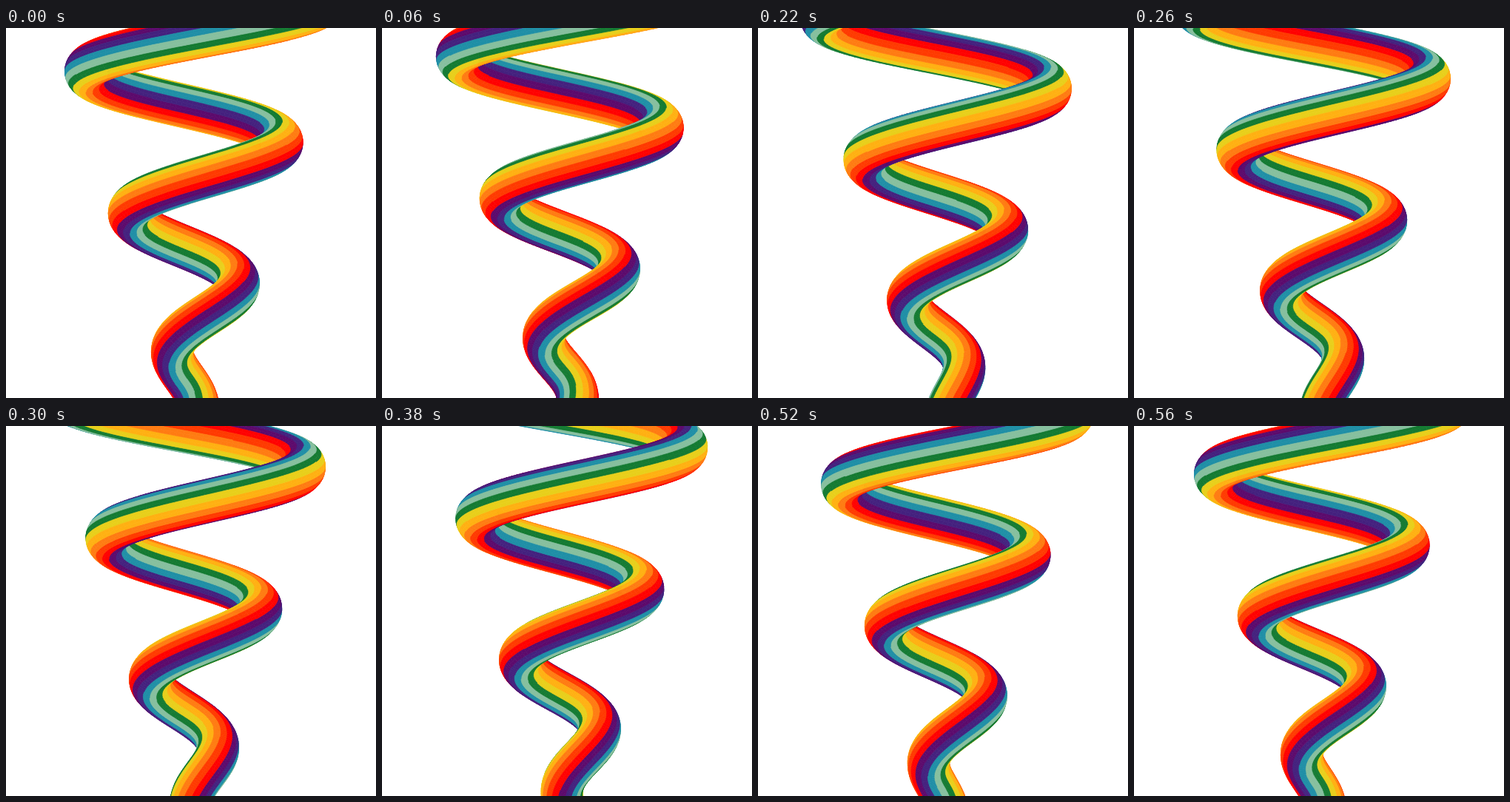
Animation of 500 by 500 pixels, one loop 580 ms. Source, as an HTML page with a canvas:

```html
<!DOCTYPE html>
<html lang="en">
<head>
<meta charset="utf-8">
<title>Rainbow helix</title>
<style>
  html, body { margin: 0; width: 100%; height: 100%; overflow: hidden; background: #fff; }
  canvas { display: block; width: 500px; height: 500px; }
</style>
</head>
<body>
<canvas id="stage" width="500" height="500"></canvas>
<script>
const SIZE = 500, STEP_MS = 20, STEPS = 29;
const COLORS = ['#1f8fa6', '#44217e', '#5c0a6c', '#ff0000', '#ff3a00',
                '#ff7b12', '#ffb012', '#e8cf1a', '#147a32', '#86bf9e'];
const FACETS = 40;            // two per stripe, the palette goes round twice
const CENTER = 255;
const PITCH = 193, OMEGA = 2 * Math.PI / PITCH, RISE = 1 / OMEGA;
const TAPER = 0.303;          // the helix widens towards the top
const TOP = -44, BOTTOM = 540, RING_GAP = 2;

// Angle, in stripes, by which a twist-free frame turns on the conical helix
function frameTurn(reach) {
  const lean = RISE * Math.hypot(1, TAPER);
  const speed = Math.hypot(reach, lean);
  return 10 / Math.PI / TAPER *
    (Math.asinh(reach / lean) - TAPER * Math.atan(TAPER * reach / speed));
}

// One cross-section of the tube at height y, as [x, y, z, normalZ] points.
function ring(y, turn) {
  const reach = 88.5 + TAPER * (250 - y);
  const tube = 28.8 + 0.003 * (250 - y);
  const u = OMEGA * (y - 253.5) + 2 * Math.PI * turn;
  const cos = Math.cos(u), sin = Math.sin(u);

  let tx = TAPER * cos + reach * OMEGA * sin;
  let ty = 1;
  let tz = TAPER * sin - reach * OMEGA * cos;
  const tl = Math.hypot(tx, ty, tz);
  tx /= tl; ty /= tl; tz /= tl;

  // Outward normal, made perpendicular to the tangent
  const dot = -cos * tx - sin * tz;
  let nx = -cos - dot * tx, ny = -dot * ty, nz = -sin - dot * tz;
  const nl = Math.hypot(nx, ny, nz);
  nx /= nl; ny /= nl; nz /= nl;

  const bx = ny * tz - nz * ty;
  const by = nz * tx - nx * tz;
  const bz = nx * ty - ny * tx;

  // The tube also spins half a turn per loop
  const shift = 23.3 - frameTurn(reach) + 10 * turn;
  const points = [];
  for (let j = 0; j <= FACETS; j++) {
    const a = (j / 2 - shift) * Math.PI / 10;
    const c = Math.cos(a), s = Math.sin(a);
    const face = c * nz + s * bz;
    points.push([
      CENTER - reach * cos + tube * (c * nx + s * bx),
      y + tube * (c * ny + s * by),
      -reach * sin + tube * face,
      face
    ]);
  }
  return points;
}

function render(turn) {
  const canvas = document.createElement('canvas');
  canvas.width = canvas.height = SIZE;
  const ctx = canvas.getContext('2d');
  ctx.fillStyle = '#fff';
  ctx.fillRect(0, 0, SIZE, SIZE);
  ctx.lineWidth = 0.7;
  ctx.lineJoin = 'round';

  const quads = [];
  let prev = ring(TOP, turn);
  for (let y = TOP + RING_GAP; y <= BOTTOM; y += RING_GAP) {
    const next = ring(y, turn);
    for (let j = 0; j < FACETS; j++) {
      const corners = [prev[j], prev[j + 1], next[j + 1], next[j]];
      if (corners.every(p => p[3] < 0)) continue;
      const depth = corners.reduce((sum, p) => sum + p[2], 0);
      quads.push({ corners, depth, color: COLORS[(j >> 1) % 10] });
    }
    prev = next;
  }

  quads.sort((a, b) => a.depth - b.depth);
  for (const { corners, color } of quads) {
    ctx.fillStyle = ctx.strokeStyle = color;
    ctx.beginPath();
    for (const [x, y] of corners) ctx.lineTo(x, y);
    ctx.closePath();
    ctx.fill();
    ctx.stroke();
  }
  return canvas;
}

const stage = document.getElementById('stage').getContext('2d');
const cache = [];
let start, shown = -1;

function draw(now) {
  if (start === undefined) start = now;
  const step = Math.floor(Math.max(0, now - start) / STEP_MS) % STEPS;
  if (step !== shown) {
    cache[step] = cache[step] || render(step / STEPS);
    stage.drawImage(cache[step], 0, 0);
    shown = step;
  }
  requestAnimationFrame(draw);
}
requestAnimationFrame(draw);
</script>
</body>
</html>
```
